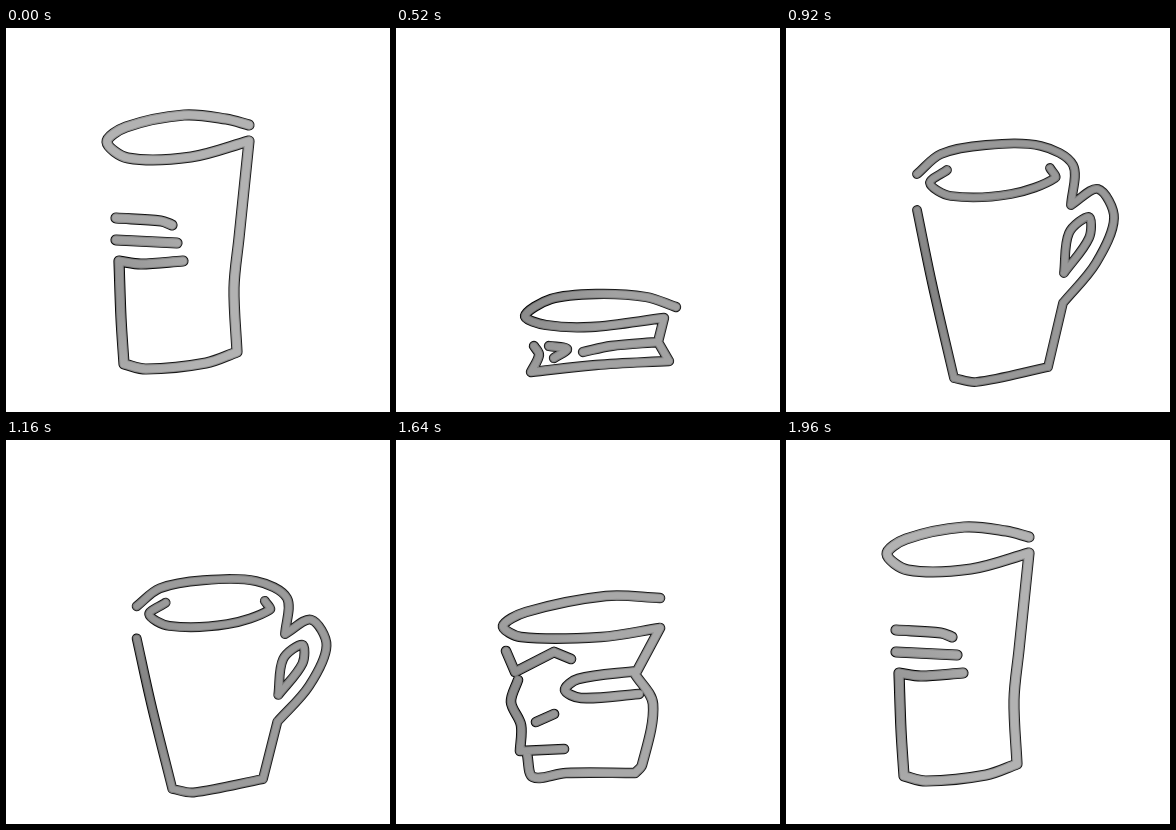
Recreate the animation shown at these times as an HTML page with a canvas. Size 384 by 384 pixels, loop 2.08 s.

```html
<!DOCTYPE html>
<html lang="en">
<head>
<meta charset="utf-8">
<title>Glass to mug</title>
<style>
html, body { margin: 0; height: 100%; overflow: hidden; background: #fff; }
canvas { display: block; width: 384px; height: 384px; }
</style>
</head>
<body>
<canvas width="384" height="384"></canvas>
<script>
const ctx = document.querySelector('canvas').getContext('2d');
ctx.lineCap = ctx.lineJoin = 'round';

// One line per smooth stroke; ^ marks a sharp corner.
function parse(text) {
  const strokes = [];
  for (const line of text.trim().split('\n')) {
    let stroke = [];
    strokes.push(stroke);
    for (const word of line.trim().split(' ')) {
      const point = word.split(',').map(parseFloat);
      stroke.push(point);
      if (word.endsWith('^')) strokes.push(stroke = [point]);
    }
  }
  return strokes;
}

const glass = parse(`
  243,97 220,91 178,87 120,99 101,114 122,130 185,129 243,113^ 233,210 228,260 231,324^ 200,335 140,341 118,336^ 115,290 113,233^ 135,236 177,233
  110,190 155,193 166,197
  110,212 171,215`);

const face = parse(`
  258,104 180,99 120,111 106,122 125,137 185,139 235,136 260,126^ 249,159^ 211,172 187,197
  231,171 246,200 216,262 240,323^ 216,334 170,336 119,328^ 133,281
  120,241 134,280 169,291
  129,208 152,268
  175,215 175,238 198,254
  126,162 155,175 144,186 114,183`);

const frown = parse(`
  264,158 210,156 130,172 107,186 125,197 205,197 264,188^ 241,231^ 182,239 169,250 185,258 243,254
  239,234 257,264 246,325 239,333^ 170,333 137,337 131,314
  122,240 115,262 125,285 124,311^ 168,309
  140,282 158,274
  110,211 119,232^ 158,212^ 175,219`);

const crushed = parse(`
  280,279 250,269 200,266 155,271 129,288 150,297 195,299 268,290^ 262,314^ 215,318 187,324
  262,314 273,333^ 200,337 135,344^ 143,327 138,318
  153,318 171,321 158,330`);

const mug = parse(`
  131,146 155,126 200,117 255,118 287,137 285,177^ 312,161 328,190 310,235 277,275^ 262,339^ 190,354 168,350^ 146,255 131,182
  161,142 144,155 165,168 225,166 269,150 264,140
  278,245 283,205 303,189 303,210 278,245`);

const mix = (a, b, k) => a + (b - a) * k;
const ease = k => k * k * (3 - 2 * k);

function bounds(drawing) {
  const points = drawing.flat();
  return [Math.min, Math.max].flatMap(pick => [0, 1].map(k => pick(...points.map(p => p[k]))));
}

function fit(drawing, box) {
  const own = bounds(drawing);
  const move = (v, k) => mix(box[k], box[k + 2], (v - own[k]) / (own[k + 2] - own[k]));
  return drawing.map(s => s.map(p => p.map(move)));
}

// The nearer drawing, stretched to a box on the way from one to the other.
function between(a, b, k) {
  const end = bounds(b);
  return fit(k < 0.5 ? a : b, bounds(a).map((v, i) => mix(v, end[i], ease(k))));
}

// Joins the points of every stroke with a spline whose handles follow the spacing.
function toPath(drawing) {
  const path = new Path2D();
  for (const s of drawing) {
    const at = i => s[Math.max(0, Math.min(s.length - 1, i))];
    const gap = i => Math.hypot(at(i + 1)[0] - at(i)[0], at(i + 1)[1] - at(i)[1]);
    const handle = (i, length) => at(i).map((v, k) =>
      v + (at(i + 1)[k] - at(i - 1)[k]) / (gap(i - 1) + gap(i)) * length / 3);
    path.moveTo(...s[0]);
    for (let i = 0; i < s.length - 1; i++) {
      path.bezierCurveTo(...handle(i, gap(i)), ...handle(i + 1, -gap(i)), ...s[i + 1]);
    }
  }
  return path;
}

const keys = [[0, glass], [3, face], [4, frown], [6, crushed], [10, mug]];
const poses = [];
keys.slice(1).forEach(([end, b], n) => {
  const [start, a] = keys[n];
  for (let i = start; i < end; i++) poses.push(toPath(between(a, b, (i - start) / (end - start))));
});
poses.push(toPath(mug));

const LOOP = 2080;

// The poses run forwards, rest on the mug, then run back.
function poseAt(t) {
  const u = t < LOOP / 2 ? t : LOOP - t - 0.01;
  return u >= 920 ? 10 : Math.max(0, Math.min(9, Math.floor((u - 40) / 80)));
}

// Gray that darkens towards the lower left.
function shade(level) {
  const fill = ctx.createRadialGradient(110, 260, 20, 110, 260, 110);
  [level - 26, level].forEach((v, i) => fill.addColorStop(i, `rgb(${v},${v},${v})`));
  return fill;
}

function draw() {
  const i = poseAt(performance.now() % LOOP);
  const gray = 178 - 2.6 * i, width = 11.2 - 0.14 * i;
  ctx.clearRect(0, 0, 384, 384);
  for (const [level, inset] of [[26, 0], [gray - 28, 1.9], [gray, 4]]) {
    ctx.strokeStyle = shade(level);
    ctx.lineWidth = width - inset;
    ctx.stroke(poses[i]);
  }
  requestAnimationFrame(draw);
}
draw();
</script>
</body>
</html>
```
